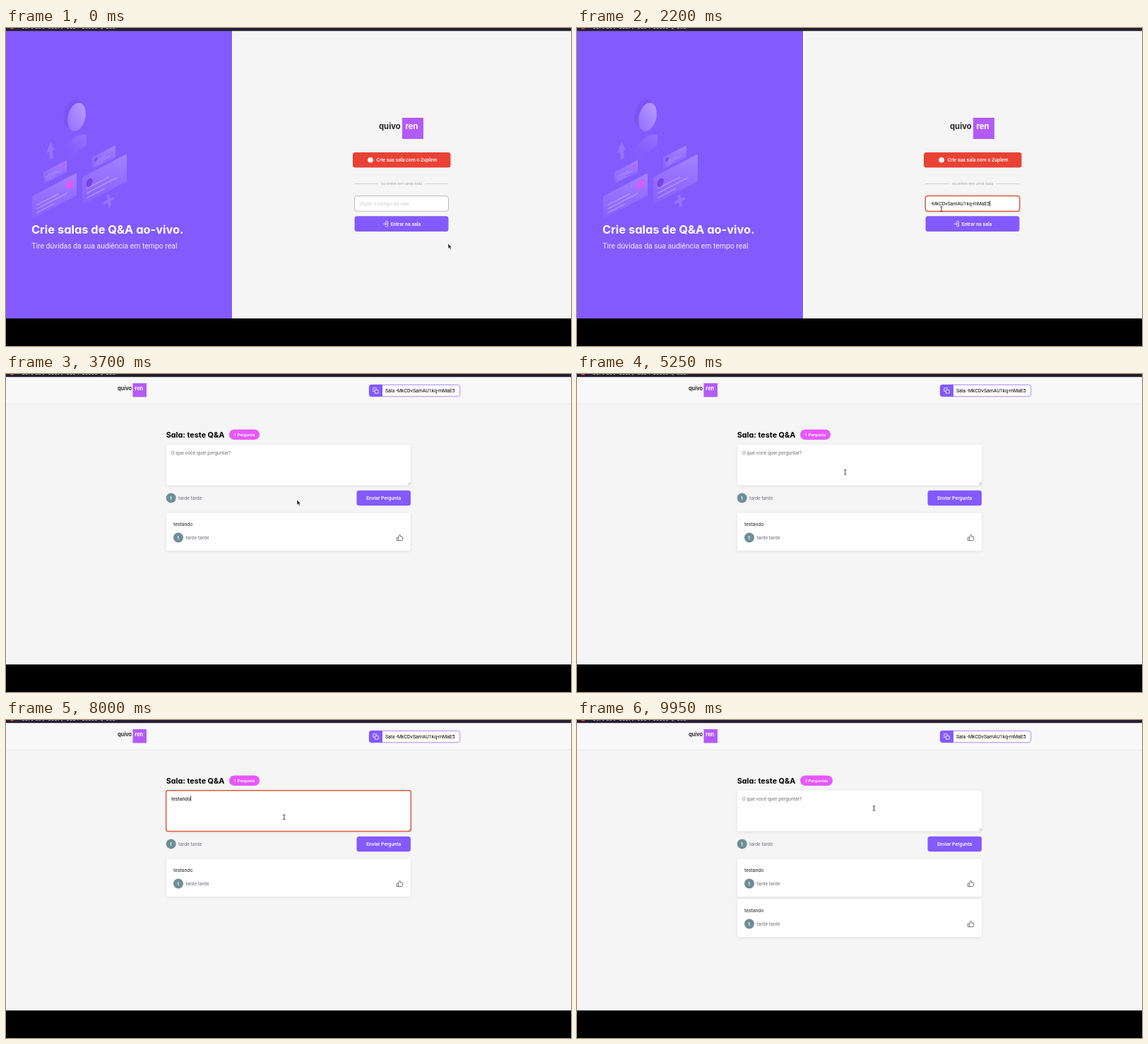
These frames come from a looping animation (800x450 px, 10 s). An HTML page:

```html
<!DOCTYPE html>
<html lang="pt-BR">
<head>
<meta charset="utf-8">
<title>Salas de perguntas</title>
<style>
  html, body { margin: 0; width: 100%; height: 100%; overflow: hidden; background: #000; }
  svg { display: block; width: 100vw; height: 100vh; }
  text { font: 400 6.93px Roboto, sans-serif; white-space: pre; }
  .medium { font-weight: 500; }
  .small { font-size: 6.07px; }
  .white { fill: #fff; }
  .dark { fill: #29292e; }
  .muted { fill: #737380; }
  .title { font: 700 16.4px Inter, sans-serif; font-feature-settings: "cv11"; }
  .brand { font: 700 11.3px Inter, sans-serif; }
  .icon { fill: none; stroke-width: .8; stroke-linecap: round; stroke-linejoin: round; }
  .card { fill: #fefefe; filter: drop-shadow(0 1px 2px rgba(0, 0, 0, .09)); }
  .ring { fill: none; stroke: #dc603d; stroke-width: 1.5; }
</style>
</head>
<body>
<svg viewBox="0 0 800 450">
  <defs>
    <linearGradient id="head" x1=".8" y1="0" x2=".2" y2="1">
      <stop offset="0" stop-color="#b79cff"/><stop offset="1" stop-color="#966fff"/>
    </linearGradient>
    <linearGradient id="body" x1=".9" y1="0" x2=".3" y2="1">
      <stop offset="0" stop-color="#9a78ff" stop-opacity=".8"/><stop offset="1" stop-color="#835afd" stop-opacity="0"/>
    </linearGradient>
    <linearGradient id="panel" x1="1" y1="0" x2="0" y2="1">
      <stop offset="0" stop-color="#ab8dff" stop-opacity=".85"/><stop offset="1" stop-color="#9874ff" stop-opacity=".25"/>
    </linearGradient>
    <g id="brand">
      <text class="brand dark" x="528" y="143">quivo</text>
      <rect x="561" y="127" width="30" height="30" fill="#b35bf8"/>
      <text class="brand white" x="565.5" y="143" font-style="italic">ren</text>
    </g>
    <g id="user">
      <circle cx="7" cy="0" r="7" fill="#6f8e97"/>
      <text class="white medium" x="7" y="2.4" text-anchor="middle">t</text>
      <text class="muted" x="17.2" y="2.7">tarde tarde</text>
    </g>
    <g id="question">
      <rect class="card" x="227" y="196.500" width="346" height="53.500" rx="3"/>
      <text class="dark" x="237" y="214.700">testando</text>
      <use href="#user" x="237" y="231.500"/>
      <path class="icon" stroke="#55555f" stroke-width="1" d="M553.700 231.200h2v4.400h-2zM555.700 231.200l1.700-3.800q1.400 0 1.300 1.500v1.400h2.500q.9.100.7 1l-.6 3.500q-.2.800-1 .8h-4.600"/>
    </g>
  </defs>

  <rect width="800" height="411" fill="#f5f5f5"/>

  <g id="login">
    <path d="M0 4h320v407H0z" fill="#835afd"/>
    <path d="M320 4h2v407h-2z" fill="#fcfbff"/>
    <g id="art">
      <ellipse cx="95" cy="121" rx="13" ry="21" transform="rotate(17 95 121)" fill="#7850f0" opacity=".65"/>
      <ellipse cx="100" cy="126" rx="12.300" ry="20.500" transform="rotate(14 100 126)" fill="url(#head)"/>
      <path d="M77 196q0-28 20-41 9-6 17-4v15q-15 8-26 24z" fill="url(#body)"/>
      <path d="M63 161l6 11-3 1 1 11-5 2-1-11-4 2z" fill="#9b78ff" opacity=".8"/>
      <path d="M142 237l4-2 1 6 6-2v4l-5 2 1 7-4 2-1-7-6 3v-4l6-3z" fill="#a283ff" opacity=".65"/>
    </g>
    <text class="title white" x="36" y="291.300">Crie salas de Q&amp;A ao-vivo.</text>
    <text x="36.300" y="312.300" style="font-size:10.4px" fill="#f2edff">Tire dúvidas da sua audiência em tempo real</text>
    <use href="#brand"/>
    <rect id="social" x="491" y="176" width="138.500" height="21.500" rx="3.500"/>
    <circle cx="516" cy="186.700" r="3.800" fill="#fff"/>
    <text class="medium white" x="524.500" y="189">Crie sua sala com o Zuplem</text>
    <path d="M493 220.500h33.500M593 220.500h33.500" stroke="#b4b4bd" stroke-width=".6"/>
    <text class="small" x="531" y="222.200" fill="#a8a8b3">ou entre em uma sala</text>
    <rect x="493.500" y="237.700" width="133" height="21.600" rx="3.500" fill="#fefefe" stroke="#a8a8b3" stroke-width=".8"/>
    <rect id="codeRing" class="ring" x="493.200" y="237.400" width="133.600" height="22.200" rx="3.500"/>
    <text id="code" x="500.800" y="251"></text>
    <rect id="enter" x="493.500" y="266.300" width="133" height="21.700" rx="3.500"/>
    <path class="icon" stroke="#fff" d="M537.700 273.700h2.700v7h-2.700M533.700 277.200h5M536.700 275.200l2 2-2 2"/>
    <text class="medium white" x="544.800" y="279.700">Entrar na sala</text>
  </g>

  <g id="room">
    <path d="M0 4h800v38H0z" fill="#f8f8f8"/>
    <path d="M0 42.300h800" stroke="#e2e2e2" stroke-width=".7"/>
    <use href="#brand" transform="translate(-185.200 -69.500) scale(.65)"/>
    <rect x="514.300" y="15.300" width="128.500" height="16.500" rx="3.500" fill="#fefefe" stroke="#835afd" stroke-width=".7"/>
    <path d="M533 15v17h-15.500q-3.500 0-3.500-3.500v-10q0-3.500 3.500-3.500z" fill="#835afd"/>
    <path class="icon" stroke="#fff" d="M522.700 22.500h4.500v4.700h-4.500zM521.300 24.500h-1.500v-4.700h4.700v1.200"/>
    <text x="537" y="25.800">Sala -MkCDvSamAU1kq-mMaE5</text>
    <text class="title" x="226.700" y="89.500" style="font-size:10.8px">Sala: teste Q&amp;A</text>
    <rect id="pill" x="316" y="78.500" height="14.500" rx="7.250" fill="#e559f9"/>
    <text id="count" class="small medium white" y="87.800" text-anchor="middle"></text>
    <rect class="card" x="227" y="99.800" width="346" height="57.500" rx="3"/>
    <path d="M569.500 156.500l3-3M571.500 156.500l1-1" stroke="#777" stroke-width=".7"/>
    <rect id="askRing" class="ring" x="226.700" y="99.700" width="346.600" height="57.900" rx="3"/>
    <text id="ask" x="234" y="113.500"></text>
    <use href="#user" x="226.700" y="175.400"/>
    <rect id="send" x="496.500" y="164.800" width="76.500" height="21.500" rx="3.500"/>
    <text class="medium white" x="534.700" y="178" text-anchor="middle">Enviar Pergunta</text>
    <use href="#question"/>
    <use id="second" href="#question" y="57"/>
  </g>

  <path id="caret" stroke="#222" stroke-width=".8"/>

  <g id="bar">
    <path d="M0 0h800v4.300H0z" fill="#251f2e"/>
    <circle cx="8.500" cy="-1.500" r="3" fill="#f0473b"/>
    <path d="M23 .4h10M36 .6h2m4-.2h7m3 .2h2m6-.2h15m3 .4h2m6-.4h12m4 0h1m5 0h22m4 .5h3m5-.5h14" stroke="#aaa5b2" stroke-width="1" stroke-dasharray="3 1.500" fill="none"/>
  </g>
  <path d="M0 411h800v39H0z"/>

  <g id="pointer">
    <path id="arrow" d="M0 0v7.400l1.800-1.600 1.200 2.700 1.200-.6-1.200-2.500h2.300z" fill="#222" stroke="#fff" stroke-width=".5"/>
    <path id="beam" d="M-1.800-3.200h1.300l.5.400.5-.4h1.300M0-2.800v5.600M-1.800 3.200h1.300l.5-.4.5.4h1.300" fill="none" stroke="#333" stroke-width=".9"/>
    <path id="hand" d="M-.7-3.500q.7-.8 1.400 0v2.800l2.500.5q.8.200.7 1.200l-.6 3h-3.800l-2.500-3.300q.3-1 1.300-.5l1 .8z" stroke-width=".6"/>
  </g>
</svg>
<script>
const LOOP = 10000;
const PASTE = 1850, ENTER = 2700, OPEN = 3100, FOCUS = 5900, TYPE = 6660, KEY = 130, POST = 9250;
const $ = id => document.getElementById(id);
const show = (id, on) => $(id).setAttribute("display", on ? "inline" : "none");
const set = (id, attrs) => { for (const k in attrs) $(id).setAttribute(k, attrs[k]); };

// Slanted message panels behind the headline
function panel(x, y, w, h, dot, fill) {
  const k = w / 63, line = (u, v, len) => `M${u * w} ${v * h}h${len * w}`;
  $("art").insertAdjacentHTML("beforeend", `
    <g transform="matrix(1 -.52 0 1 ${x} ${y})">
      <rect width="${w}" height="${h}" rx="${2 * k}" fill="url(#panel)"/>
      <path d="${line(.1, .5, .5) + line(.1, .67, .68) + line(.1, .84, .4)}" stroke="#c3adff" stroke-width="${1.7 * k}" opacity=".65"/>
      <ellipse cx="${dot * w}" cy="${.33 * h}" rx="${5.3 * k}" ry="${6.3 * k}" fill="${fill}" stroke="#b36bff" stroke-width="${k}"/>
    </g>`);
}
panel(53, 204, 33, 17, .84, "#c85cf2");
panel(122, 183, 33, 17, .16, "#7950ef");
panel(37, 238, 63, 32, .84, "#df59f4");
panel(108, 211, 63, 39, .16, "#7048e8");

// time, x, y
const path = [
  [0, 626, 305], [300, 626, 305], [1000, 507, 249], [2050, 507, 249], [2550, 548, 282],
  [3250, 548, 282], [3650, 412, 178], [4400, 412, 178], [5500, 375, 133],
  [7850, 375, 133], [8600, 554, 175], [9350, 554, 175], [9850, 420.500, 125], [LOOP, 420.500, 125]
];
function pointerAt(t) {
  t = Math.max(0, t);
  const i = path.findIndex((p, n) => n && t <= p[0]);
  const [t0, x0, y0] = path[i - 1], [t1, x1, y1] = path[i];
  const u = (t - t0) / (t1 - t0), e = u * u * (3 - 2 * u);
  return [x0 + (x1 - x0) * e, y0 + (y1 - y0) * e];
}
const inside = ([x, y], l, top, r, b) => x > l && x < r && y > top && y < b;
const over = {
  social: p => inside(p, 491, 176, 629, 197),
  enter: p => inside(p, 493, 266, 627, 288),
  send: p => inside(p, 496, 165, 573, 186)
};

// Button colour fades over 200 ms while hovered
function tint(id, t, r, g, b) {
  let n = 0;
  for (let i = 0; i < 10; i++) n += over[id](pointerAt(t - i * 20));
  const k = 1 - .014 * n;
  $(id).setAttribute("fill", `rgb(${r * k},${g * k},${b * k})`);
}

function write(id, value, hint, hintColor) {
  const el = $(id);
  el.textContent = value || hint;
  el.setAttribute("fill", value ? "#111" : hintColor);
  return value ? el.getComputedTextLength() : 0;
}

function draw(t) {
  const room = t >= OPEN, posted = t >= POST;
  const codeFocus = t >= 1080 && t < ENTER;
  const askFocus = t >= FOCUS && !posted;
  show("login", !room);
  show("room", room);
  show("codeRing", codeFocus);
  show("askRing", askFocus);
  show("second", posted);

  tint("social", room ? 0 : t, 234, 65, 53);
  tint("enter", room ? 0 : t, 131, 90, 253);
  tint("send", t, 131, 90, 253);

  const typed = posted ? "" : "testando".slice(0, Math.max(0, Math.floor((t - TYPE) / KEY) + 1));
  const codeWidth = write("code", t >= PASTE ? "-MkCDvSamAU1kq-mMaE5" : "", "Digite o código da sala", "#cfcfcf");
  const askWidth = write("ask", typed, "O que você quer perguntar?", "#757575");

  $("count").textContent = posted ? "2 Perguntas" : "1 Pergunta";
  const pill = posted ? 46 : 43;
  set("pill", { width: pill });
  set("count", { x: 316 + pill / 2 });

  const typing = t >= TYPE && t < TYPE + 8 * KEY;
  const since = codeFocus ? t - (t < PASTE ? 1080 : PASTE) : t - (t < TYPE ? FOCUS : TYPE + 7 * KEY);
  show("caret", (codeFocus || askFocus) && (typing || since % 1000 < 500));
  set("caret", { d: room ? `M${234.4 + askWidth} 107.300v7.500` : `M${501.2 + codeWidth} 244.500v8` });

  const p = pointerAt(t);
  const hand = room ? over.send(p) : over.social(p) || over.enter(p);
  const beam = room ? inside(p, 227, 100, 573, 157) : inside(p, 493, 238, 627, 259);
  set("pointer", { transform: `translate(${p})` });
  set("hand", { fill: room ? "#fff" : "#222", stroke: room ? "#333" : "#b9a8ee" });
  show("hand", hand);
  show("beam", beam);
  show("arrow", !hand && !beam);
}

const start = performance.now();
function tick() {
  draw((performance.now() - start) % LOOP);
  requestAnimationFrame(tick);
}
tick();
</script>
</body>
</html>
```
